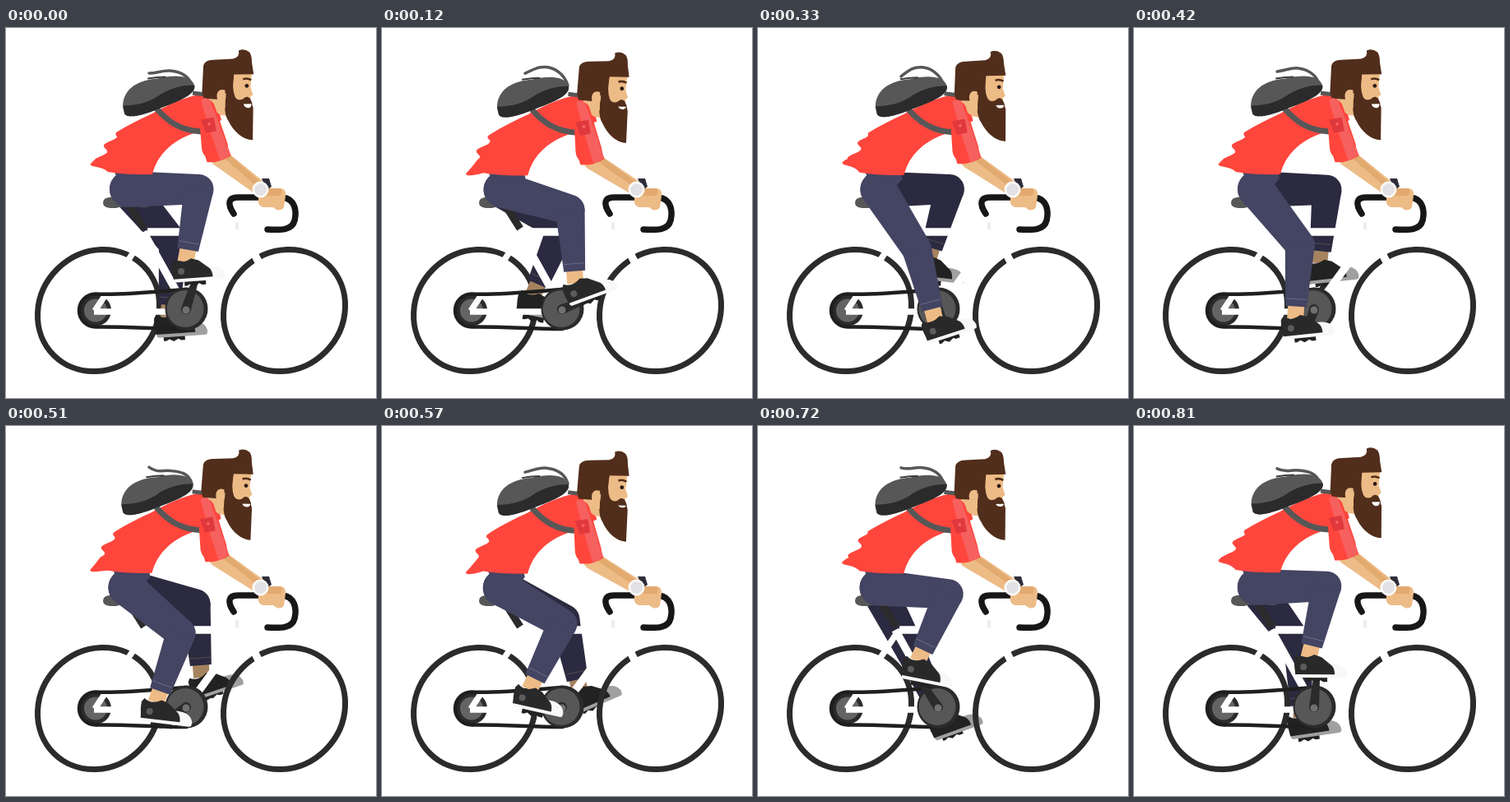
An HTML page with a canvas that plays this animation: 450 px wide and 450 px high, repeating every 0.84 s.

```html
<!DOCTYPE html>
<html>
<head>
<meta charset="utf-8">
<style>
  html, body { margin: 0; width: 100%; height: 100%; overflow: hidden; background: #fff; }
  canvas { display: block; width: 450px; height: 450px; }
</style>
</head>
<body>
<canvas id="stage" width="450" height="450"></canvas>
<script>
const ctx = document.getElementById('stage').getContext('2d');
const { sin, cos, PI, hypot, atan2, acos } = Math;
const LOOP = 840, STEP = 30, TAU = 2 * PI;
const RED = '#ff463d', BLACK = '#2b2b2b', GREY = '#575757', SKIN = '#edbb86', TAN = '#e2aa6f', HAIR = '#512e1b';
const NEAR = { pants: '#444463', seam: '#74748c', skin: SKIN, shoe: '#292929', sole: '#f8f8f8', dot: '#5c5c5c' };
const FAR = { pants: '#2b2a40', seam: '#5b5554', skin: '#a5835f', shoe: '#222', sole: '#a0a0a0', dot: '#222' };
const CRANK = { x: 219, y: 342, len: 36 };
const THIGH = 86.5, SHIN = 87;

function fill(path, color) {
  ctx.fillStyle = color;
  ctx.fill(new Path2D(path));
}

function line(path, color, width, cap = 'butt') {
  ctx.strokeStyle = color;
  ctx.lineWidth = width;
  ctx.lineCap = cap;
  ctx.lineJoin = 'round';
  ctx.stroke(new Path2D(path));
}

function disc(x, y, r, color) {
  ctx.fillStyle = color;
  ctx.beginPath();
  ctx.arc(x, y, r, 0, TAU);
  ctx.fill();
}

// Tapered limb: the outline around two circles
function limb(a, ra, b, rb, color) {
  const dir = atan2(b.y - a.y, b.x - a.x);
  const spread = acos((ra - rb) / hypot(b.x - a.x, b.y - a.y));
  ctx.fillStyle = color;
  ctx.beginPath();
  ctx.arc(a.x, a.y, ra, dir + spread, dir - spread + TAU);
  ctx.arc(b.x, b.y, rb, dir - spread, dir + spread);
  ctx.fill();
}

function group(x, y, angle, draw) {
  ctx.save();
  ctx.translate(x, y);
  ctx.rotate(angle);
  draw();
  ctx.restore();
}

function pedalAt(turn) {
  return { x: CRANK.x + CRANK.len * sin(turn), y: CRANK.y - CRANK.len * cos(turn) };
}

function tiltAt(turn) {
  return (-5 - 20 * sin(turn - 0.35)) * PI / 180;
}

function drawCrank(turn) {
  const pedal = pedalAt(turn);
  limb(CRANK, 6, pedal, 4, BLACK);
  group(pedal.x, pedal.y, tiltAt(turn), () => fill('M-13-2H13V5H8L5 3-1 6-6 3-10 5H-13Z', '#222'));
}

function drawLeg(hip, turn, look, shift) {
  const pedal = pedalAt(turn), tilt = tiltAt(turn);
  pedal.x += shift;
  const c = cos(tilt), s = sin(tilt);
  const ankle = { x: pedal.x - 11 * c + 27 * s, y: pedal.y - 11 * s - 27 * c };
  const dx = ankle.x - hip.x, dy = ankle.y - hip.y, reach = hypot(dx, dy);
  const bend = acos(Math.min(1, (THIGH ** 2 + reach ** 2 - SHIN ** 2) / (2 * THIGH * reach)));
  const aim = atan2(dy, dx) - bend;
  const knee = { x: hip.x + THIGH * cos(aim), y: hip.y + THIGH * sin(aim) };
  const shinDir = atan2(ankle.y - knee.y, ankle.x - knee.x);

  limb(hip, 22, knee, 18, look.pants);
  group(knee.x, knee.y, shinDir, () => {
    fill('M60-10H90V10H60Z', look.skin);
    fill('M0-18L75-13V13L0 18Z', look.pants);
    line('M66-12.500V12.500', look.seam, 0.8);
  });
  group(pedal.x, pedal.y, tilt, () => {
    fill('M-27-5H34Q36 0 31 0H-25Q-28-1-27-5Z', look.sole);
    fill('M17-3L13-17Q33-18 35-4Z', look.sole);
    fill('M-29-24C-30-15-28-10-28-4H20C20-10 18-14 15-16L4-25-5-28Q-17-21-26-28Z', look.shoe);
    disc(-18, -13, 4, look.dot);
  });
}

// The rims are slightly oval, leaning to the upper right
function drawWheel(x) {
  ctx.strokeStyle = BLACK;
  ctx.lineWidth = 7;
  ctx.beginPath();
  ctx.ellipse(x, 343.5, 77, 71, -PI / 4, 0, TAU);
  ctx.stroke();
}

function drawFrame() {
  line('M149 214L168 244', BLACK, 9);
  fill('M119 209Q122 204 140 206L178 207Q184 216 168 218Q146 215 134 219Q114 220 119 209Z', GREY);
  disc(109, 343.5, 19, BLACK);
  disc(109, 343.5, 14, '#646464');
  line('M167 248L216 336M172 248H286M287 250L220 342M283 238L338 344', '#fff', 9.5);
  line('M108 344L168 253M107 345H218', '#fff', 7.5);
  fill('M279 236H283V245H279Z', '#ececec');
  line('M277 226C269 214 270 206 282 206H310M337 206C351 208 354 222 351 234C348 246 335 246 318 245', '#171717', 7.5, 'round');
}

function drawDrive() {
  line('M109 323.500C140 325 180 321 219 318A25 25 0 0 1 219 366C180 366 150 363 109 363.500A20 20 0 0 1 109 323.500Z', '#1f1f1f', 4.5);
  disc(219.5, 341.5, 26, BLACK);
  disc(218, 341.5, 22.5, '#575757');
}

function drawPack(t, x, y) {
  const wag = TAU * t / 280;
  const endY = 54 + 5 * cos(wag - 1.35);
  const midY = 50.5 + 4 * cos(wag - 5.1);
  line(`M174 ${endY}C184 ${midY + 3} 190 ${midY - 1} 200 ${midY}S222 56 226 70`, GREY, 3.5, 'round');
  group(x, y, 0, () => {
    fill('M142 97C141 77 157 64 184 62C204 57 226 57 229 71C231 80 214 88 190 97C171 105 149 112 144 105Z', GREY);
    fill('M142 95C160 95 176 90 188 81C201 73 216 70 229 70C230 81 214 88 190 97C171 105 149 112 144 105Z', BLACK);
    line('M172 62Q184 60 194 60', '#3b3b3b', 2);
  });
}

function drawShirt(x, y, beat) {
  // Ripples run down the loose back edge
  let edge = '';
  for (let s = 0; s <= 0.72; s += 0.04) {
    const ripple = 5 * Math.min(1, s * 8) * cos(TAU * (s - 0.32) / 0.4 - beat);
    edge += `L${134 - 31 * s - ripple} ${127 + 47 * s}`;
  }
  const tip = 169 + 7 * cos(beat - 2.2);
  group(x, y, 0, () => {
    fill(`M244 80C222 81 196 94 178 104C162 111 147 119 134 127${edge}
      Q108 ${tip - 5} 103 ${tip}C101 ${tip + 5} 116 ${tip + 2} 124 175
      Q150 179 178 178C184 154 203 134 238 125L262 112 256 90Z`, RED);
    line('M183 98C196 113 212 125 238 126', GREY, 7);
    line('M227 79L243 81', GREY, 5);
  });
}

function drawHead(x, y, angle, smile) {
  group(272 + x, 84.5 + y, angle, () => {
    ctx.translate(-272, -85);
    fill('M246 80H270L272 108 260 106Q249 100 246 88Z', SKIN);
    fill('M268 54H299L297 73 300 82 297 84V100H268Z', SKIN);
    fill('M238 78L240 46Q242 39 252 39L276 38Q285 36 283 28Q290 25 296 30Q299 33 299 43L301 57H277L275 76 266 80 256 87 240 86Z', HAIR);
    fill('M267 56H277Q274 74 278 84Q281 90 288 87C292 82 297 85 298 91L300 98 299 137C288 137 276 127 270 114Q263 104 267 84Z', HAIR);
    fill('M266 76C258 73 254 80 257 88Q258 96 266 98Z', SKIN);
    fill(`M288 92H298Q298 ${93 + smile} 294 ${93 + smile}Q289 ${93 + smile} 288 92Z`, '#fff');
    fill('M283 93Q287 85 293 87Q298 88 299 93Z', HAIR);
    line('M288 63Q293 61 298 64', HAIR, 2.5);
    disc(292.5, 71, 2.4, '#2a1a14');
  });
}

function drawArm(drop) {
  const shoulder = { x: 244 - 2 * drop, y: 97 + 5 * drop };
  const elbow = { x: 254 - 4 * drop, y: 145 + 8 * drop };
  limb({ x: elbow.x + 5, y: elbow.y + 12 }, 11, { x: 309, y: 195 }, 9, SKIN);
  line(`M${elbow.x + 12} ${elbow.y + 9}L306 189`, TAN, 7);
  limb(shoulder, 10, elbow, 16, RED);
  const dir = atan2(elbow.y - shoulder.y, elbow.x - shoulder.x) - PI / 2;
  group(shoulder.x, shoulder.y, dir, () => {
    fill('M-15 42L-13 65Q2 69 17 63L14 40Z', RED);
    fill('M-5-10Q0-15 6-8L13 36 16 62Q9 66 3 66L-1 34Z', '#f6605e');
    fill('M-10 13H6V30H-7Z', '#e0383d');
    disc(-1, 20, 2, '#f6605e');
  });
}

function drawHand() {
  fill('M306 195H334Q341 196 340 204L338 218Q335 223 329 221L325 218H313Q305 216 307 207Z', SKIN);
  fill('M312 195H334Q337 199 334 204H312Z', TAN);
  fill('M311 183L320 183 323 193 317 197Z', '#2d2d3b');
  disc(309.5, 196.5, 10, '#fff');
  disc(309.5, 196.5, 7.5, '#e2e2e4');
}

function draw(t) {
  const turn = TAU * t / LOOP + 0.31;
  const farTurn = turn + PI + 0.1;
  const beat = TAU * t / 420;
  const drop = (1 - cos(beat)) / 2;
  const sway = cos(beat + 1.05);
  const hip = { x: 148 - 4 * drop, y: 196 + drop };

  ctx.fillStyle = '#fff';
  ctx.fillRect(0, 0, 450, 450);

  drawWheel(112.5);
  drawCrank(farTurn);
  drawLeg(hip, farTurn, FAR, 6);
  drawWheel(338.5);
  drawFrame();
  drawDrive();
  drawCrank(turn);
  disc(CRANK.x, CRANK.y + 1, 4.5, '#707070');
  group(hip.x - 148, hip.y - 196, 0, () => fill('M131 173H175L177 183 150 216Z', NEAR.pants));
  drawLeg(hip, turn, NEAR, 2);
  drawShirt(-drop, 2 * drop, beat);
  drawPack(t, 1.5 * sway - 0.5, 2 * drop - 0.5);
  drawHead(sway, 4.5 * drop, -0.022 * sway, 2 + 3 * (1 - drop));
  drawArm(drop);
  drawHand();
}

function tick() {
  draw(Math.floor(performance.now() % LOOP / STEP) * STEP);
  requestAnimationFrame(tick);
}
tick();
</script>
</body>
</html>
```
